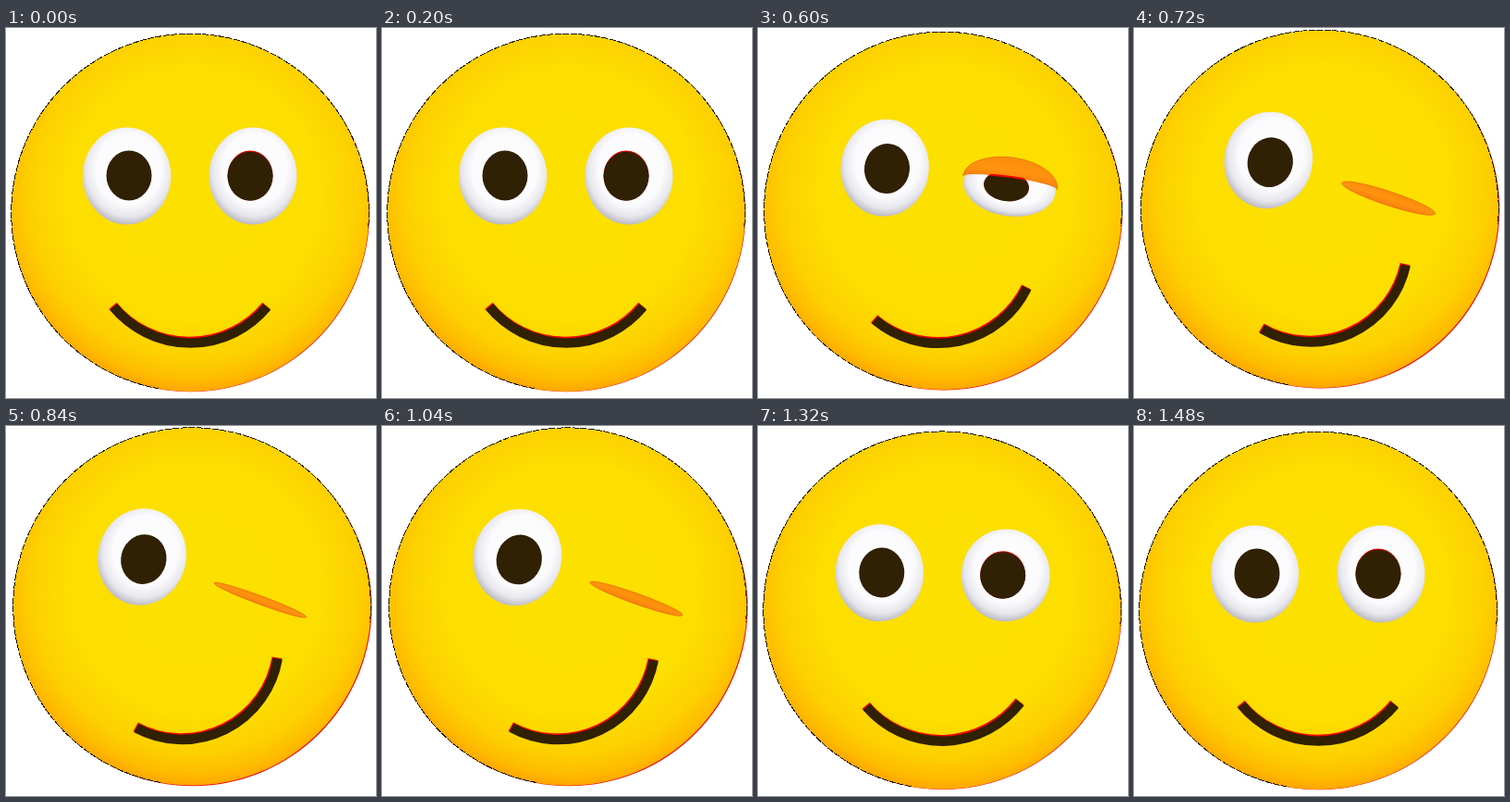
Animation of 400 by 400 pixels, one loop 3.04 s. Source, as an HTML page:

```html
<!DOCTYPE html>
<html lang="en">
<head>
<meta charset="utf-8">
<title>Winking face</title>
<style>
  html, body { margin: 0; width: 100%; height: 100%; overflow: hidden; background: #fff; }
  svg { display: block; width: 100vw; height: 100vh; }
</style>
</head>
<body>
<svg viewBox="0 0 400 400">
  <defs>
    <radialGradient id="skin" cx=".51" cy=".45" r=".56">
      <stop offset="0" stop-color="#fce100"/>
      <stop offset=".64" stop-color="#fcde00"/>
      <stop offset=".82" stop-color="#fdd000"/>
      <stop offset=".92" stop-color="#febd00"/>
      <stop offset="1" stop-color="#ffa000"/>
    </radialGradient>
    <radialGradient id="white" cx=".52" cy=".43" r=".58">
      <stop offset="0" stop-color="#fff"/>
      <stop offset=".64" stop-color="#fbfbfd"/>
      <stop offset=".84" stop-color="#e6e6ec"/>
      <stop offset="1" stop-color="#b8b6be"/>
    </radialGradient>
    <linearGradient id="lidFill" x1="0" y1="0" x2="0" y2="1">
      <stop offset="0" stop-color="#f98c08"/>
      <stop offset=".5" stop-color="#ff930e"/>
      <stop offset="1" stop-color="#f87e10"/>
    </linearGradient>
    <clipPath id="pupilClip"><ellipse id="pupilHole"/></clipPath>
  </defs>

  <g id="head">
    <circle id="rim" r="193.3" fill="#e80000"/>
    <circle r="193.5" fill="url(#skin)"/>
    <path d="M-33.6 190.4A193.3 193.3 0 1 1 192.6 16.8" fill="none" stroke="#1c1200" stroke-dasharray="7 1.5" shape-rendering="crispEdges"/>
  </g>

  <g id="leftEye">
    <ellipse rx="47.6" ry="52.5" fill="url(#white)"/>
    <ellipse id="leftPupil" rx="24.5" ry="27" fill="#302004"/>
  </g>

  <g id="rightEye">
    <ellipse id="ball" fill="url(#white)"/>
    <ellipse id="pupilEdge" fill="#d80800"/>
    <ellipse id="pupil" fill="#302004"/>
    <path id="lid" fill="url(#lidFill)" stroke="#e67408" stroke-width=".8"/>
    <path id="crease" fill="none" stroke="#f00000" stroke-width="2" clip-path="url(#pupilClip)"/>
  </g>

  <g fill="none">
    <path id="lip" stroke="#f00800" stroke-width="11" transform="translate(-.6 -.9)"/>
    <path id="mouth" stroke="#302004" stroke-width="10.4" transform="translate(.2 .4)"/>
  </g>
</svg>

<script>
  const LOOP = 3040, STEP = 40, CLOSE = 358, OPEN = 942, SPAN = 500;
  const el = {};
  document.querySelectorAll('[id]').forEach(n => el[n.id] = n);

  const set = (node, attrs) => {
    for (const k in attrs) node.setAttribute(k, attrs[k]);
  };
  const mix = (a, b, p) => a + (b - a) * p;
  // Like mix, but pushed aside by `bend` halfway
  const bow = (a, b, p, bend) => mix(a, b, p) + 4 * bend * p * (1 - p);

  function ease(x) {
    const t = Math.min(1, Math.max(0, x));
    return t < .5 ? 4 * t ** 3 : 1 - 4 * (1 - t) ** 3;
  }

  function wink(t) {
    if (t >= 840 && t < 1040) return 1;
    return t < 900 ? ease((t - CLOSE) / SPAN) : 1 - ease((t - OPEN) / SPAN);
  }

  const place = (node, x, y, deg = 0) =>
    set(node, { transform: `translate(${x} ${y}) rotate(${deg})` });

  function arc(cx, cy, r, from, to) {
    const at = deg => {
      const a = deg * Math.PI / 180;
      return `${cx + r * Math.cos(a)} ${cy + r * Math.sin(a)}`;
    };
    return `M${at(from)}A${r} ${r} 0 0 1 ${at(to)}`;
  }

  function drawRightEye(p) {
    const rx = mix(47.5, 53, p), ry = bow(52.5, 4.6, p, 1);
    place(el.rightEye, bow(267, 274.8, p, 1.4), bow(160, 188.2, p, -1.2), bow(0, 20.3, p, -1));

    const open = p < .9;
    const prx = 24.5, pry = ry * 27 / 52.5, cx = mix(-3, -4, p);
    set(el.ball, { rx, ry, visibility: open ? 'visible' : 'hidden' });
    set(el.pupilEdge, { cx, cy: -.5, rx: prx, ry: pry });
    set(el.pupil, { cx, cy: .2, rx: prx, ry: Math.max(0, pry - .5) });
    set(el.pupilHole, { cx, cy: 0, rx: prx, ry: pry });

    // Lower edge of the lid: 1 is fully raised, -1 fully shut
    const k = Math.max(-1, 1 - 3.75 * p * p);
    const lx = bow(rx, rx, p, 1.5), y = bow(0, 0, p, -4.5), ly = ry + y;
    const edge = `A${lx} ${Math.abs(k) * ly} 0 0 ${k > 0 ? 0 : 1} ${-lx} ${y}`;
    const shown = p > .08 ? 'visible' : 'hidden';
    set(el.lid, { d: `M${-lx} ${y}A${lx} ${ly} 0 0 1 ${lx} ${y}${edge}Z`, visibility: shown });
    set(el.crease, { d: `M${lx} ${y}${edge}`, visibility: open ? shown : 'hidden' });
  }

  function drawMouth(p) {
    const d = arc(
      mix(199, 190, p), bow(232.7, 233.6, p, 1), mix(107.5, 105, p),
      mix(39.5, 9.7, p), mix(140.5, 118, p)
    );
    set(el.lip, { d });
    set(el.mouth, { d });
  }

  function draw(p) {
    place(el.head, mix(199, 201, p), mix(199.5, 195, p));
    place(el.rim, mix(.7, 1.1, p), mix(.5, .9, p));
    place(el.leftEye, bow(130.6, 147, p, -.9), bow(160, 141.5, p, -.5), 14.7 * p);
    set(el.leftPupil, { cx: 2.4, cy: mix(-.5, 2, p) });
    drawRightEye(p);
    drawMouth(p);
  }

  function tick() {
    const t = performance.now() % LOOP;
    draw(wink(Math.floor(t / STEP) * STEP));
    requestAnimationFrame(tick);
  }
  tick();
</script>
</body>
</html>
```
